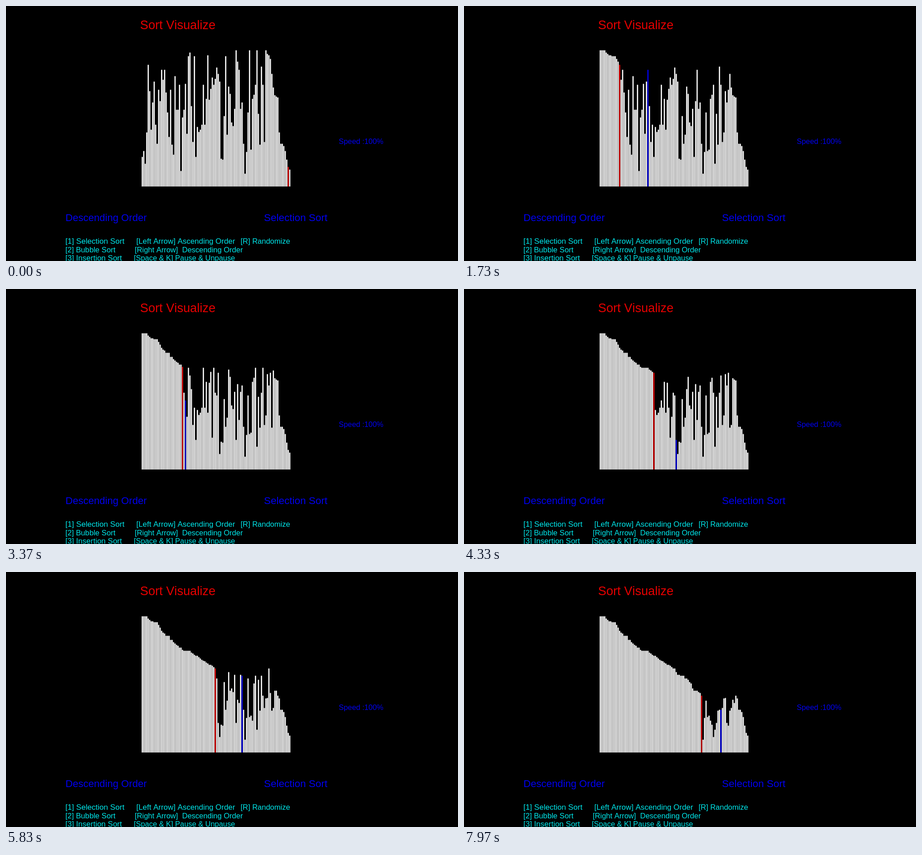
An HTML page with a canvas for the animation above (8000 ms loop, 997 px wide and 562 px high).

```html
<!DOCTYPE html>
<html lang="en">
<head>
<meta charset="utf-8">
<title>Sort Visualize</title>
<style>
  html, body { margin: 0; width: 100%; height: 100%; overflow: hidden; background: #000; }
  canvas { display: block; }
</style>
</head>
<body>
<canvas id="stage" width="997" height="562"></canvas>
<script>
const ctx = document.getElementById('stage').getContext('2d');

const LOOP = 8000, FIRST_PASS = 196, PASS_TIME = 114;
const BASE = 397.8, LEFT = 299.3, PITCH = 3.286, BAR_WIDTH = 2.6;
const RED = '#e60000', BLUE = '#0000ee', CYAN = '#00e6ea';

// Top edge of each bar before sorting; a smaller value is a taller bar.
const START = [
  333, 320, 348, 279, 130, 188, 273, 213, 167, 262, 304, 185, 210, 141, 163, 141, 191, 235, 289, 185,
  306, 328, 155, 229, 229, 174, 364, 246, 229, 172, 282, 111, 103, 221, 300, 111, 333, 267, 278, 273,
  262, 174, 262, 205, 109, 207, 183, 158, 174, 161, 136, 150, 167, 337, 339, 243, 111, 284, 178, 194,
  257, 265, 227, 98, 123, 141, 227, 213, 304, 370, 322, 235, 98, 317, 205, 196, 174, 98, 238, 306,
  134, 174, 300, 98, 106, 109, 117, 150, 180, 197, 200, 202, 279, 304, 304, 309, 320, 339, 355, 361
];

// [text, x, baseline, size, color]
const LABELS = [
  ['Sort Visualize', 295.8, 50.5, 27.2, RED],
  ['Speed :100%', 734, 304, 16.4, BLUE],
  ['Descending Order', 131.3, 474, 22.1, BLUE],
  ['Selection Sort', 569, 474, 22.5, BLUE],
  ['[1] Selection Sort', 131, 524, 17.1, CYAN],
  ['[Left Arrow] Ascending Order', 287.5, 524, 16.9, CYAN],
  ['[R] Randomize', 517.5, 524, 16.5, CYAN],
  ['[2] Bubble Sort', 131, 542.5, 16.7, CYAN],
  ['[Right Arrow]  Descending Order', 284, 542.5, 16.5, CYAN],
  ['[3] Insertion Sort', 131, 561, 17, CYAN],
  ['[Space & K] Pause & Unpause', 282, 561, 16.4, CYAN]
];

// Selection sort after the given number of passes, with the last swapped pair.
function sortState(passes) {
  const tops = START.slice();
  let current = 98, swapped = 98;
  for (let i = 0; i < passes; i++) {
    let best = i;
    for (let j = i + 1; j < tops.length; j++) if (tops[j] < tops[best]) best = j;
    [tops[i], tops[best]] = [tops[best], tops[i]];
    current = i;
    swapped = best;
  }
  return { tops, current, swapped };
}

function draw(time) {
  ctx.fillStyle = '#000';
  ctx.fillRect(0, 0, 997, 562);

  const passes = Math.max(0, Math.floor((time - FIRST_PASS) / PASS_TIME) + 1);
  const { tops, current, swapped } = sortState(passes);
  tops.forEach((top, i) => {
    ctx.fillStyle = i === current ? RED : i === swapped ? BLUE : '#fff';
    ctx.fillRect(LEFT + i * PITCH, top - 0.4, BAR_WIDTH, BASE - top + 0.4);
  });

  ctx.fontKerning = 'none';
  for (const [text, x, y, size, color] of LABELS) {
    ctx.font = `${size}px "Liberation Sans", Arial, sans-serif`;
    ctx.fillStyle = color;
    ctx.fillText(text, x, y);
  }
}

const startTime = performance.now();
function tick() {
  draw((performance.now() - startTime) % LOOP);
  requestAnimationFrame(tick);
}
tick();
</script>
</body>
</html>
```
